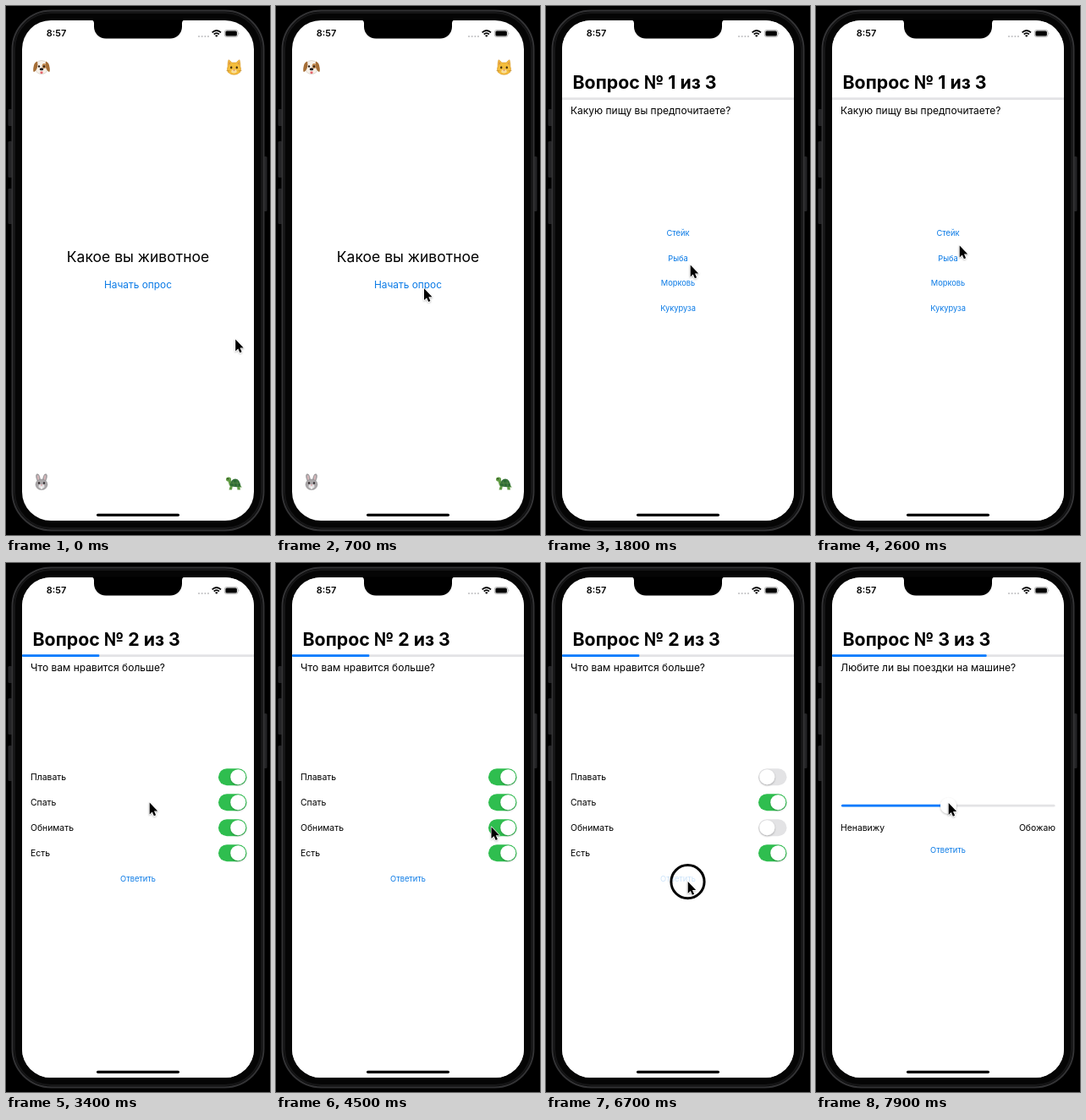
These frames come from a looping animation (312 px wide and 626 px high, 8 s). An HTML page:

```html
<!DOCTYPE html>
<html lang="ru">
<head>
<meta charset="utf-8">
<style>
  html, body { margin: 0; width: 100%; height: 100%; overflow: hidden; background: #000; }
  svg { display: block; width: 312px; height: 626px; font-family: Inter, "Open Sans", sans-serif; }
  .title { font-size: 21.3px; font-weight: 700; }
  .body { font-size: 12px; }
  .label { font-size: 10.4px; }
  .btn { font-size: 9.3px; fill: #0a7ae6; text-anchor: middle; }
  .mid { text-anchor: middle; }
  .track { fill: #e3e3e5; }
  .blue { fill: #007aff; }
</style>
</head>
<body>
<svg viewBox="0 0 312 626">
  <defs>
    <clipPath id="screen"><rect x="19" y="17" width="274" height="592" rx="34"/></clipPath>
    <filter id="soft" x="-50%" y="-50%" width="200%" height="200%">
      <feDropShadow dx="0" dy="1" stdDeviation="1.3" flood-opacity=".3"/>
    </filter>
  </defs>

  <!-- phone body -->
  <rect width="312" height="626"/>
  <g fill="#242426">
    <rect x="2.5" y="122" width="5" height="20" rx="1.5"/>
    <rect x="2.5" y="160" width="5" height="43" rx="1.5"/>
    <rect x="2.5" y="216" width="5" height="42" rx="1.5"/>
    <rect x="304.5" y="178" width="4" height="65" rx="1.5"/>
  </g>
  <rect x="7.5" y="5.5" width="297" height="615" rx="46" fill="#050505" stroke="#333335" stroke-width="2"/>
  <rect x="10" y="8" width="292" height="610" rx="43" fill="none" stroke="#161617" stroke-width="2"/>

  <g clip-path="url(#screen)">
    <rect x="19" y="17" width="274" height="592" fill="#fff"/>

    <!-- start screen -->
    <g id="start">
      <text class="mid" x="156" y="303" font-size="17.5">Какое вы животное</text>
      <text id="begin" class="btn" x="156" y="334" style="font-size:11.9px">Начать опрос</text>
      <g transform="translate(42 72.5)">
        <path d="M-6-5Q-4-8 0-8T6-5L7.500 3Q5 8 0 8T-7.500 3Z" fill="#f6f1ea" stroke="#c4b5a4" stroke-width=".5"/>
        <path d="M-5-7Q-9-6-9.700 1T-7 4Q-5 2-4.500-3ZM5-7Q9-6 9.700 1T7 4Q5 2 4.500-3Z" fill="#a56d35"/>
        <ellipse cx="3" cy="-1.500" rx="2.400" ry="3" fill="#c28a51"/>
        <circle cx="-3" cy="-1" r="1.200" fill="#2a1c14"/><circle cx="3" cy="-1" r="1.200" fill="#2a1c14"/>
        <ellipse cy="2.300" rx="2.300" ry="1.500" fill="#1c1717"/>
        <path d="M-1.500 5H1.500V7Q0 8.500-1.500 7Z" fill="#e5636a"/>
      </g>
      <g transform="translate(269.500 72.500)">
        <path d="M-6.500-8.800Q-4.500-8-2.800-5.500H2.800Q4.500-8 6.500-8.800Q7.600-5 7.400-1Q9 3 7 6Q4 8.800 0 8.800T-7 6Q-9 3-7.400-1Q-7.600-5-6.500-8.800Z"
          fill="#f4bd3c" stroke="#d6942a" stroke-width=".6"/>
        <path d="M-6-6.800L-4-4.500-6-2.500ZM6-6.800L4-4.500 6-2.500Z" fill="#d98c4a"/>
        <ellipse cx="-3.300" cy=".3" rx="1.200" ry="1.500" fill="#4a3510"/>
        <ellipse cx="3.300" cy=".3" rx="1.200" ry="1.500" fill="#4a3510"/>
        <ellipse cy="4.800" rx="3.200" ry="2.200" fill="#f9df9a"/>
        <path d="M-1.200 3H1.200L0 4.400Z" fill="#c9585b"/>
        <path d="M-9 4L-5 4.300M9 4L5 4.300" stroke="#a87722" stroke-width=".5"/>
      </g>
      <g transform="translate(42 563.500)">
        <g fill="#aaa7a9" stroke="#858286" stroke-width=".5">
          <ellipse cx="-4" cy="-5" rx="2.100" ry="4.800" transform="rotate(-14 -4 -5)"/>
          <ellipse cx="4" cy="-5" rx="2.100" ry="4.800" transform="rotate(14 4 -5)"/>
          <path d="M0-3.500Q6.500-3.500 7 3Q6 9 0 9T-7 3Q-6.500-3.500 0-3.500Z"/>
        </g>
        <path d="M-4.300-8L-3.700-3M4.300-8L3.700-3" stroke="#e3b9bd" stroke-width="1.500"/>
        <circle cx="-3" cy="1" r="1.200" fill="#302a2d"/><circle cx="3" cy="1" r="1.200" fill="#302a2d"/>
        <ellipse cy="5" rx="3.500" ry="2.400" fill="#e6e4e5"/>
        <path d="M-1.200 3H1.200L0 4.400Z" fill="#cf7f8a"/>
        <rect x="-1" y="6" width="2" height="2" fill="#fff"/>
      </g>
      <g transform="translate(269 564.500)">
        <g fill="#5f9a43">
          <ellipse cx="-6" cy="-4.500" rx="3" ry="2.600"/>
          <path d="M-7-4L-3-3-1 3H-5ZM-4 3H-1L-2 8H-5.500ZM4 3H7L8 8H4.500ZM7 2L10 5 6 5Z"/>
        </g>
        <path d="M-4.500 3Q-3-5 2-5T8.500 4Q2 6-4.500 3Z" fill="#2f6b35"/>
        <path d="M-1-3L1 4M4-4L4.500 4M-3 0H7" stroke="#5c8f49" stroke-width=".6"/>
        <circle cx="-6.800" cy="-5" r=".7" fill="#16200f"/>
      </g>
    </g>

    <!-- survey sheet -->
    <g id="sheet">
      <rect x="19" y="17" width="274" height="600" fill="#fff"/>
      <text id="title" class="title" x="31.500" y="98.300"></text>
      <rect id="track" class="track" x="19" y="108.300" width="274" height="2.800"/>
      <rect id="bar" class="blue" x="19" y="108.300" height="2.800" rx="1"/>
      <text id="question" class="body" x="29" y="128.200"></text>
      <g id="page1">
        <text id="pick" class="btn" x="156" y="272.300">Стейк</text>
        <text class="btn" x="156" y="301.800">Рыба</text>
        <text class="btn" x="156" y="331.300">Морковь</text>
        <text class="btn" x="156" y="360.800">Кукуруза</text>
      </g>
      <g id="page2">
        <g id="rows"></g>
        <text id="answer" class="btn" x="156" y="376.600">Ответить</text>
      </g>
      <g id="page3">
        <rect class="track" x="30" y="285.800" width="252.500" height="2.800" rx="1.400"/>
        <rect class="blue" x="30" y="285.800" width="126" height="2.800" rx="1.400"/>
        <circle cx="156.500" cy="287.200" r="9.500" fill="#fff" filter="url(#soft)"/>
        <text class="label" x="29" y="317">Ненавижу</text>
        <text class="label" x="283" y="317" text-anchor="end">Обожаю</text>
        <text class="btn" x="156" y="343">Ответить</text>
      </g>
    </g>
  </g>

  <!-- notch, status bar, home indicator -->
  <path d="M100 16.500A4 4 0 0 1 104 20.500V24.500A14 14 0 0 0 118 38.500H194A14 14 0 0 0 208 24.500V20.500A4 4 0 0 1 212 16.500Z"/>
  <text class="mid" x="59.500" y="36.300" font-size="10.900" font-weight="600">8:57</text>
  <g fill="#c2c2c4">
    <circle cx="228" cy="36" r="1.100"/><circle cx="231.700" cy="36" r="1.100"/>
    <circle cx="235.400" cy="36" r="1.100"/><circle cx="239" cy="36" r="1.100"/>
  </g>
  <g fill="none" stroke="#000" stroke-width="1.700">
    <path d="M243.600 31.300Q248.800 26.700 254 31.300M245.700 33.500Q248.800 30.800 251.900 33.500"/>
  </g>
  <path d="M247 35Q248.800 33.700 250.600 35L248.800 36.800Z"/>
  <rect x="258.300" y="28.500" width="15.700" height="8" rx="2.500" fill="none" stroke="#999" stroke-width=".7"/>
  <rect x="259.400" y="29.600" width="13.500" height="5.800" rx="1.500"/>
  <path d="M274.800 31V34Q276 32.500 274.800 31Z" fill="#888"/>
  <rect x="107" y="600.700" width="98" height="3.200" rx="1.600"/>

  <g id="pointer">
    <circle id="ring" cy=".7" r="19.600" fill="none" stroke="#000" stroke-width="3"/>
    <path d="M.2.500V14.400L3.300 11.500 5.400 16.200 7.600 15.200 5.500 10.500H9.700Z" stroke="#fff" stroke-width="1.200"
      stroke-linejoin="round" paint-order="stroke" filter="url(#soft)"/>
  </g>
</svg>

<script>
  const LOOP = 8000, STEP = 100;
  const $ = id => document.getElementById(id);
  const clamp = u => Math.min(1, Math.max(0, u));
  const span = (t, a, b) => clamp((t - a) / (b - a));
  const smooth = u => u * u * (3 - 2 * u);
  const show = (id, on) => $(id).setAttribute('visibility', on ? 'inherit' : 'hidden');
  const press = (id, on) => $(id).setAttribute('opacity', on ? .2 : 1);

  const questions = ['Какую пищу вы предпочитаете?', 'Что вам нравится больше?', 'Любите ли вы поездки на машине?'];
  const labels = ['Плавать', 'Спать', 'Обнимать', 'Есть'];
  const offAt = [5200, LOOP, 4700, LOOP];
  const clicks = [900, 2900, 4700, 5200, 6700];

  // pointer moves: start, end, x, y
  const moves = [
    [0, 0, 271, 394], [0, 800, 170.5, 331], [1400, 1800, 170.5, 306], [1800, 2300, 169.5, 283],
    [4200, 4600, 270, 317], [4800, 5100, 269.5, 258], [5400, 6000, 179, 358],
    [6000, 6200, 168, 379], [6300, 6500, 167.5, 376.5], [7200, 7700, 156.5, 283.5]
  ];

  $('rows').innerHTML = labels.map((name, i) => {
    const y = 253.2 + 30 * i;
    return `<text class="label" x="29" y="${y + 3.8}">${name}</text>
      <rect class="pill" x="251" y="${y - 10}" width="33.500" height="20" rx="10"/>
      <circle class="knob" cy="${y}" r="9" fill="#fff" filter="url(#soft)"/>`;
  }).join('');
  const pills = document.querySelectorAll('.pill');
  const knobs = document.querySelectorAll('.knob');

  function mix(a, b, u) {
    return `rgb(${a.map((v, i) => Math.round(v + (b[i] - v) * u))})`;
  }

  function pointerAt(t) {
    let [, , x, y] = moves[0];
    for (const [a, b, nx, ny] of moves.slice(1)) {
      const u = smooth(span(t, a, b));
      x += (nx - x) * u;
      y += (ny - y) * u;
    }
    return `translate(${x} ${y})`;
  }

  // critically damped spring, 1 falling to 0
  function spring(ms) {
    const x = Math.max(0, ms) * .01826;
    return (1 + x) * Math.exp(-x);
  }

  function draw(t) {
    const page = t < 3000 ? 0 : t < 6800 ? 1 : 2;
    const done = smooth(span(t, 2950, 3250)) + smooth(span(t, 6750, 7050));

    $('sheet').setAttribute('transform', `translate(0 ${592 * spring(t - 1084)})`);
    $('title').textContent = `Вопрос № ${page + 1} из 3`;
    $('question').textContent = questions[page];
    $('track').setAttribute('opacity', span(t, 1200, 1500));
    $('bar').setAttribute('width', 274 / 3 * done);
    for (let i = 0; i < 3; i++) show('page' + (i + 1), i === page);

    offAt.forEach((at, i) => {
      const u = span(t, at, at + 280);
      const slide = 1 - (1 - u) ** 4, fade = 1 - (1 - u) ** 2;
      pills[i].setAttribute('fill', mix([47, 190, 79], [227, 227, 229], fade));
      knobs[i].setAttribute('cx', 274.3 - 13 * slide);
    });

    const down = clicks.find(c => t >= c && t < c + 100);
    press('begin', down === 900);
    press('pick', down === 2900);
    press('answer', down === 6700);
    show('ring', down !== undefined);
    $('pointer').setAttribute('transform', pointerAt(t));
  }

  const began = performance.now();
  function tick() {
    const t = (performance.now() - began) % LOOP;
    draw(Math.floor(t / STEP) * STEP);
    requestAnimationFrame(tick);
  }
  tick();
</script>
</body>
</html>
```
